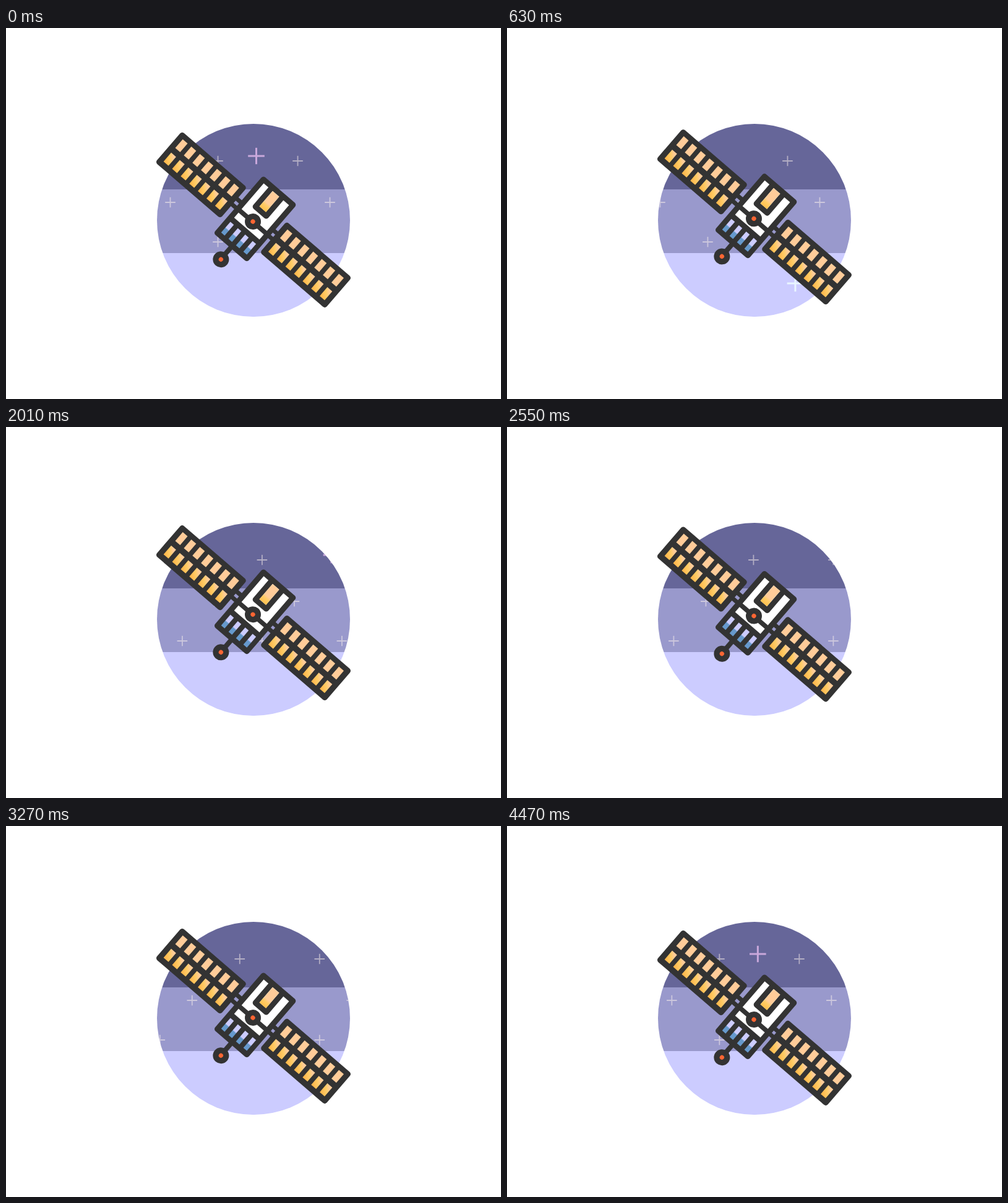
Recreate the animation shown at these times as an HTML page. Size 800 px wide and 600 px high, loop 4500 ms.

```html
<!DOCTYPE html>
<html lang="en">
<head>
<meta charset="utf-8">
<title>Satellite</title>
<style>
  html, body { margin: 0; width: 100%; height: 100%; overflow: hidden; background: #fff; }
  svg { display: block; width: 100%; height: 100%; }
</style>
</head>
<body>
<svg viewBox="0 0 800 600">
  <defs>
    <clipPath id="disc"><circle cx="400" cy="311" r="156"/></clipPath>
    <linearGradient id="gold" x1="0.75" y1="0" x2="0.25" y2="1">
      <stop offset="0.15" stop-color="#ffcc99"/>
      <stop offset="0.48" stop-color="#ffcc66"/>
      <stop offset="0.95" stop-color="#ffb84d"/>
    </linearGradient>
    <linearGradient id="window" x1="0" y1="0" x2="0" y2="1">
      <stop offset="0.62" stop-color="#ffcc99"/>
      <stop offset="0.76" stop-color="#ffcc66"/>
      <stop offset="1" stop-color="#ffc04d"/>
    </linearGradient>
    <linearGradient id="blue" x1="0" y1="0" x2="0" y2="1">
      <stop offset="0.5" stop-color="#ccccff"/>
      <stop offset="0.58" stop-color="#6699cc"/>
    </linearGradient>
  </defs>
  <g clip-path="url(#disc)">
    <rect x="240" y="150" width="320" height="111" fill="#666699"/>
    <rect x="240" y="261" width="320" height="103" fill="#9999cc"/>
    <rect x="240" y="364" width="320" height="110" fill="#ccccff"/>
    <g id="stars" fill="none"></g>
  </g>
  <g id="craft"><g id="parts" transform="rotate(40.75)" stroke-linejoin="round"></g></g>
</svg>
<script>
const NS = 'http://www.w3.org/2000/svg';
const LOOP = 4500, STEP = 30, TILE = 129, RISE = 10;
const DARK = '#333333', PINK = '#ffccff', PALE = '#fff6f0';
const byId = id => document.getElementById(id);
const stars = byId('stars'), parts = byId('parts'), craft = byId('craft');

function add(parent, tag, attrs) {
  const el = document.createElementNS(NS, tag);
  for (const key in attrs) el.setAttribute(key, attrs[key]);
  parent.appendChild(el);
  return el;
}
const box = (x, y, width, height, fill, extra) =>
  add(parts, 'rect', { x, y, width, height, fill, ...extra });
const line = (d, width) =>
  add(parts, 'path', { d, fill: 'none', stroke: DARK, 'stroke-width': width });
const outline = { stroke: DARK, 'stroke-width': 9 };

function knob(x, y) {
  add(parts, 'circle', { cx: x, cy: y, r: 13, fill: DARK });
  add(parts, 'circle', { cx: x, cy: y, r: 3.6, fill: '#ff6633' });
}

function wing(mid) {
  box(mid - 65, -31.2, 130, 57.1, DARK, outline);
  for (let i = -3; i <= 3; i++) {
    const x = mid + i * 18.3 - 5.2;
    box(x, -26.9, 10.4, 18.6, '#ffcc99');
    box(x, 1.7, 10.4, 18.9, 'url(#gold)');
  }
}

function buildCraft() {
  line('M-50 0.8H50', 7);
  line('M-50 -11H50', 7);
  line('M0.4 50V80', 8);
  wing(-112.7);
  wing(110.7);
  box(-31.6, -62.8, 63, 114.2, '#fff', outline);
  box(-31.6, 19.5, 63, 31.9, DARK);
  line('M-31 19.5H31', 9);
  for (let i = 0; i < 4; i++) box(-27.3 + i * 15.8, 24, 7.4, 22.9, 'url(#blue)');
  line('M-12.6 -62V-21H10.4V-62', 9);
  box(-8.1, -58.3, 14, 32.8, 'url(#window)');
  line('M-31 0.4H31', 7.5);
  knob(0, 0);
  knob(0.8, 80);
}

function cross(arm, width, stroke, opacity) {
  return add(stars, 'path', {
    d: `M${-arm} 0H${arm}M0 ${-arm}V${arm}`,
    stroke, 'stroke-width': width, 'stroke-opacity': opacity
  });
}

// Small stars repeat along each row; large ones drift too, but fade in and out.
const small = [];
for (const [x, y] of [[342.5, 215], [265.5, 282], [342.5, 346]])
  for (let i = -1; i < 4; i++) small.push({ x: x + i * TILE, y, el: cross(8.3, 1.8, PALE, 0.5) });

const large = [
  { x: 404.5, y: 207, peak: 0, span: 560, glow: 0.65, tint: PINK },
  { x: 484, y: 413, peak: 500, span: 620, glow: 0.85, tint: '#f0ffff' },
  { x: 583.6, y: 207, peak: 2010, span: 500, glow: 0.65, tint: PINK }
].map(s => ({ ...s, el: cross(13.3, 3, s.tint, 1) }));

const move = (el, x, y) => el.setAttribute('transform', `translate(${x.toFixed(2)} ${y.toFixed(2)})`);
const easeOut = p => 1 - (1 - p) ** 2;

function draw(t) {
  const half = LOOP / 2;
  const lift = t < half ? easeOut(t / half) : 1 - easeOut(t / half - 1);
  move(craft, 399, 313.1 - RISE * lift);

  const speed = TILE / LOOP;
  for (const s of small) move(s.el, s.x - t * speed, s.y);
  for (const s of large) {
    let gap = t - s.peak;
    if (gap > half) gap -= LOOP;
    move(s.el, s.x - (gap + s.peak) * speed, s.y);
    const near = Math.max(0, 1 - Math.abs(gap) / s.span);
    s.el.setAttribute('opacity', s.glow * Math.sin(near * Math.PI / 2));
  }
}

buildCraft();
const start = performance.now();
function tick() {
  const t = Math.max(0, performance.now() - start) % LOOP;
  draw(Math.floor(t / STEP) * STEP);
  requestAnimationFrame(tick);
}
draw(0);
requestAnimationFrame(tick);
</script>
</body>
</html>
```
